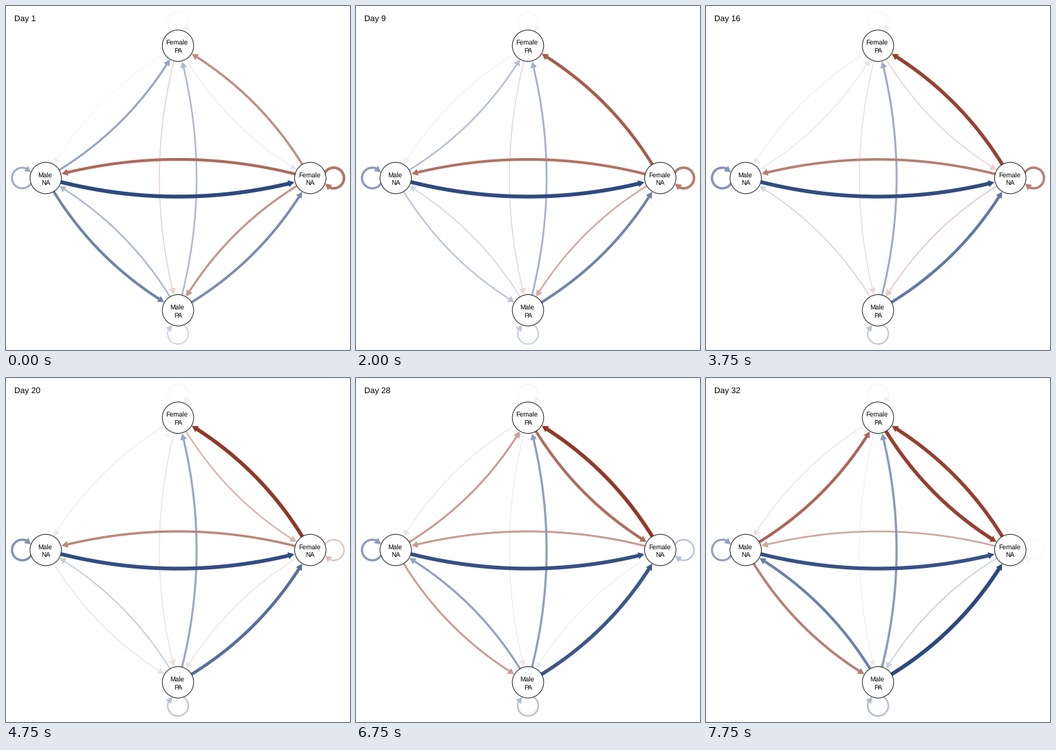
A matplotlib script for the animation above (8000 ms loop, 500x500 px).

```python
import numpy as np
import matplotlib.pyplot as plt
from matplotlib.animation import FuncAnimation
from matplotlib.patches import Circle, Polygon

plt.rcParams["text.hinting"] = "none"

SIZE, DPI = 500, 100
PT = 72 / DPI            # points per pixel
FRAMES, INTERVAL = 32, 250
RADIUS = 22.8
SPREAD = 192.3           # distance of the nodes from the middle
BEND = 0.0703            # bulge of an edge relative to its length
LOOP_R, LOOP_DIST = 15, 34
HEAD_LEN, HEAD_HALF = 9, 5

BLUE = np.array([44, 72, 126]) / 255
RED = np.array([139, 48, 30]) / 255
GREY = np.array([0.4, 0.4, 0.4])

# Direction of each node from the middle, and its label
NODES = {
    "FP": (0, -1, "Female", "PA"),
    "FN": (1, 0, "Female", "NA"),
    "MP": (0, 1, "Male", "PA"),
    "MN": (-1, 0, "Male", "NA"),
}
DAYS = np.arange(1, FRAMES + 1)


def drift(start, end, sag=0):
    """Weight per day on a parabola; sag is its offset from a line midway."""
    u = np.linspace(0, 1, FRAMES)
    return start + (end - start) * u + 4 * sag * u * (1 - u)


def turns(*points):
    """Weight per day along straight runs between (day, weight) points."""
    return np.interp(DAYS, *zip(*points))


# Signed edge weights: blue above zero, red below
WEIGHTS = {
    ("MN", "FN"): drift(1, 0.95),
    ("FN", "MN"): drift(-0.71, -0.41, -0.05),
    ("FP", "MP"): drift(-0.2, -0.09, -0.02),
    ("MP", "FP"): drift(0.37, 0.54),
    ("FP", "MN"): drift(-0.06, -0.14),
    ("MN", "FP"): drift(0.48, -0.73, 0.24),
    ("FN", "FP"): drift(-0.54, -0.92, -0.19),
    ("FP", "FN"): drift(0.11, -0.92, 0.19),
    ("MN", "MP"): drift(0.67, -0.61, -0.03),
    ("MP", "MN"): drift(0.37, 0.68, -0.31),
    ("FN", "MP"): drift(-0.5, 0.24, -0.1),
    ("MP", "FN"): drift(0.62, 1, -0.07),
    ("FP", "FP"): drift(0.07, 0.07),
    ("MN", "MN"): drift(0.45, 0.5, 0.1),
    ("FN", "FN"): turns((1, -0.66), (16, -0.6), (28, 0.33), (32, 0.05)),
    ("MP", "MP"): drift(0.24, 0.35),
}


def center(name):
    return SIZE / 2 + SPREAD * np.array(NODES[name][:2])


def arc_path(a, b):
    """Curve from a to b that bulges to the right of its heading."""
    t = np.linspace(0, 1, 400)[:, None]
    d = b - a
    side = np.array([-d[1], d[0]]) * BEND
    return a + d * t + side * 4 * t * (1 - t)


def loop_path(name):
    """Clockwise circle on the outer side of a node."""
    out = np.array(NODES[name][:2])
    mid = center(name) + out * LOOP_DIST
    start = np.arctan2(-out[1], -out[0])
    angle = start + np.linspace(0, 2 * np.pi, 400)
    return mid + LOOP_R * np.column_stack([np.cos(angle), np.sin(angle)])


def split_path(path, target):
    """Return the visible line and the arrowhead that touches the target."""
    outside = np.hypot(*(path - target).T) >= RADIUS + 0.2
    last = np.nonzero(outside)[0][-1]
    tip = path[last]
    gap = np.hypot(*(path[:last] - tip).T)
    base = np.nonzero(gap >= HEAD_LEN)[0][-1]
    d = (tip - path[base]) / np.linalg.norm(tip - path[base])
    n = np.array([-d[1], d[0]]) * HEAD_HALF
    back = tip - d * HEAD_LEN
    return path[:base + 4], [tip, back + n, back - n]


def shade(w):
    """Fade towards white, and towards grey when very weak."""
    a = min(abs(w), 1)
    k = min(1, a / 0.2)
    hue = GREY * (1 - k) + (BLUE if w > 0 else RED) * k
    return 1 - (0.02 + 0.98 * a) * (1 - hue)


fig = plt.figure(figsize=(SIZE / DPI, SIZE / DPI), dpi=DPI, facecolor="white")
ax = fig.add_axes([0, 0, 1, 1])
ax.set(xlim=(0, SIZE), ylim=(SIZE, 0))
ax.axis("off")


def label(x, y, text, size, ha="center"):
    return ax.text(x, y, text, fontsize=size * PT, ha=ha, va="baseline",
                   family="Liberation Sans", color="black", zorder=11)


edges = []
for (src, dst), weights in WEIGHTS.items():
    end = center(dst)
    path = loop_path(src) if src == dst else arc_path(center(src), end)
    line_pts, head_pts = split_path(path, end)
    line, = ax.plot(*line_pts.T, solid_capstyle="butt")
    head = ax.add_patch(Polygon(head_pts, closed=True, linewidth=0))
    edges.append((line, head, weights))

for name, (_, _, who, mood) in NODES.items():
    x, y = center(name)
    ax.add_patch(Circle((x, y), RADIUS, facecolor="white", edgecolor="#222222",
                        linewidth=PT, zorder=10))
    label(x - 1.3, y - 1.4, who, 9.6)
    label(x, y + 10.3, mood, 9.6)

title = label(12, 22, "", 12, ha="left")


def update(i):
    title.set_text(f"Day {DAYS[i]}")
    for line, head, weights in edges:
        w = weights[i]
        color = shade(w)
        line.set(color=color, linewidth=(0.5 + 5.1 * abs(w)) * PT,
                 zorder=1 + abs(w))
        head.set(facecolor=color, zorder=1 + abs(w))
    return []


anim = FuncAnimation(fig, update, frames=FRAMES, interval=INTERVAL,
                     repeat=True, repeat_delay=0)
plt.show()
```
